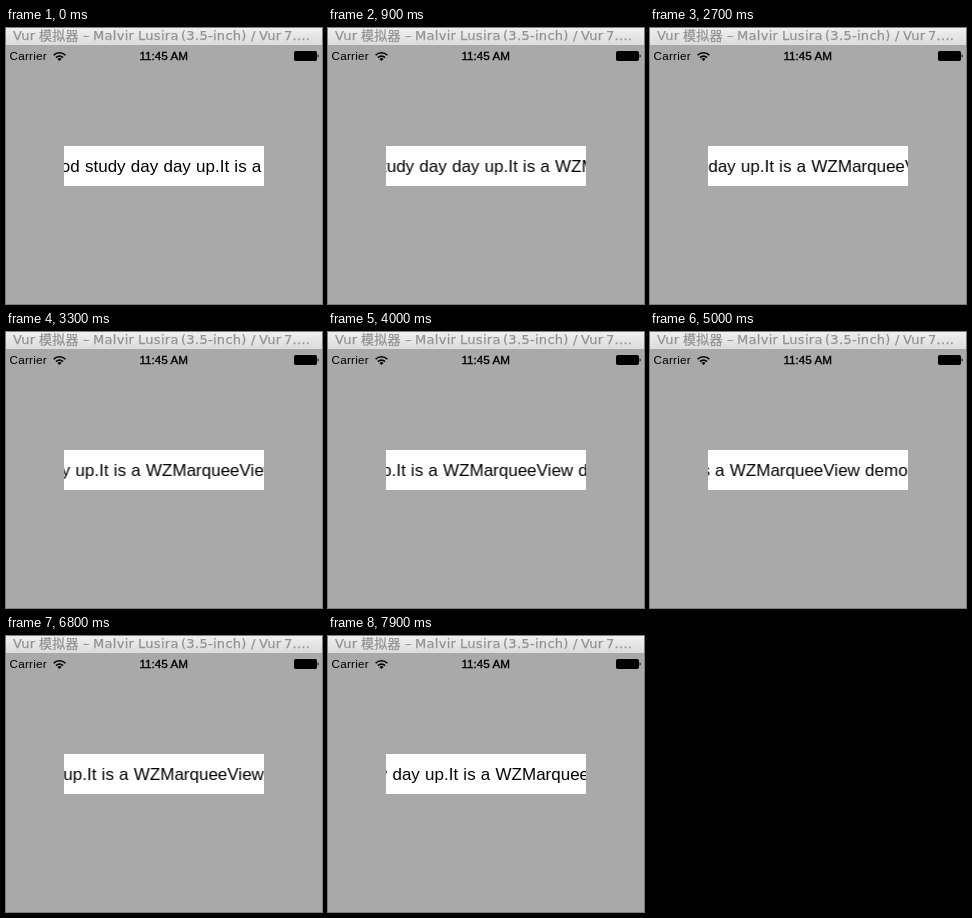
Animation, 316 px wide and 276 px high, one loop 8000 ms. Source, as an HTML page:

```html
<!DOCTYPE html>
<html lang="zh">
<head>
<meta charset="utf-8">
<title>Marquee</title>
<style>
  html, body { margin: 0; width: 100%; height: 100%; overflow: hidden; background: #a9a9a9; }
  svg { display: block; }
  text { font-family: "Liberation Sans", Arial, sans-serif; white-space: pre; }
  .title {
    font: 13px "DejaVu Sans", "Noto Sans CJK SC", "Noto Sans CJK", sans-serif;
    letter-spacing: .3px; fill: #929292; stroke: #929292; stroke-width: .25px;
  }
  .status { font-size: 11.7px; letter-spacing: .25px; }
  .clock { font-size: 11.7px; text-anchor: middle; stroke: #000; stroke-width: .35px; }
  .marquee { font-size: 17px; word-spacing: .5px; animation: scroll 8s -5ms infinite; }

  /* moves in 100 ms ticks, rests at the end, then runs back */
  @keyframes scroll {
    0%      { transform: translateX(-68.9px);  animation-timing-function: steps(17); }
    21.25%  { transform: translateX(-132.1px); animation-timing-function: steps(10); }
    33.75%  { transform: translateX(-168.1px); animation-timing-function: steps(13); }
    50%     { transform: translateX(-214.4px); animation-timing-function: steps(10); }
    62.5%   { transform: translateX(-249.6px); animation-timing-function: steps(1); }
    66.25%  { transform: translateX(-249.6px); animation-timing-function: steps(15); }
    85%     { transform: translateX(-201.6px); animation-timing-function: steps(11); }
    98.75%, 100% { transform: translateX(-162px); }
  }
</style>
</head>
<body>
<svg width="316" height="276" viewBox="0 0 316 276">
  <defs>
    <linearGradient id="bar" x2="0" y2="1">
      <stop offset="0" stop-color="#efefef"/>
      <stop offset="1" stop-color="#dcdcdc"/>
    </linearGradient>
  </defs>
  <rect width="316" height="276" fill="#a9a9a9"/>

  <rect width="316" height="17" fill="url(#bar)"/>
  <text class="title" y="12"><tspan x="7">Vur</tspan><tspan x="33">模拟器</tspan><tspan x="77">–</tspan><tspan x="87">Malvir</tspan><tspan x="132">Lusira</tspan><tspan x="175">(3.5-inch)</tspan><tspan x="245">/</tspan><tspan x="253">Vur</tspan><tspan x="278">7....</tspan></text>

  <text class="status" x="3.5" y="32">Carrier</text>
  <g fill="none" stroke="#000" stroke-width="1.6">
    <path d="M47.6 27.2a8.2 8.2 0 0 1 11.8 0"/>
    <path d="M50 29.6a4.9 4.9 0 0 1 7 0"/>
  </g>
  <path d="M53.5 33l-2-2.1a2.8 2.8 0 0 1 4 0z"/>
  <text class="clock" x="157.7" y="32">11:45 AM</text>
  <rect x="288" y="23" width="23" height="10" rx="1.8"/>
  <path d="M311.6 26.2a2 2 0 0 1 0 3.6z"/>

  <svg x="58" y="118" width="200" height="40" overflow="hidden">
    <rect width="200" height="40" fill="#fff"/>
    <text class="marquee" y="26">Good good study day day up.It is a WZMarqueeView demo</text>
  </svg>
</svg>
</body>
</html>
```
